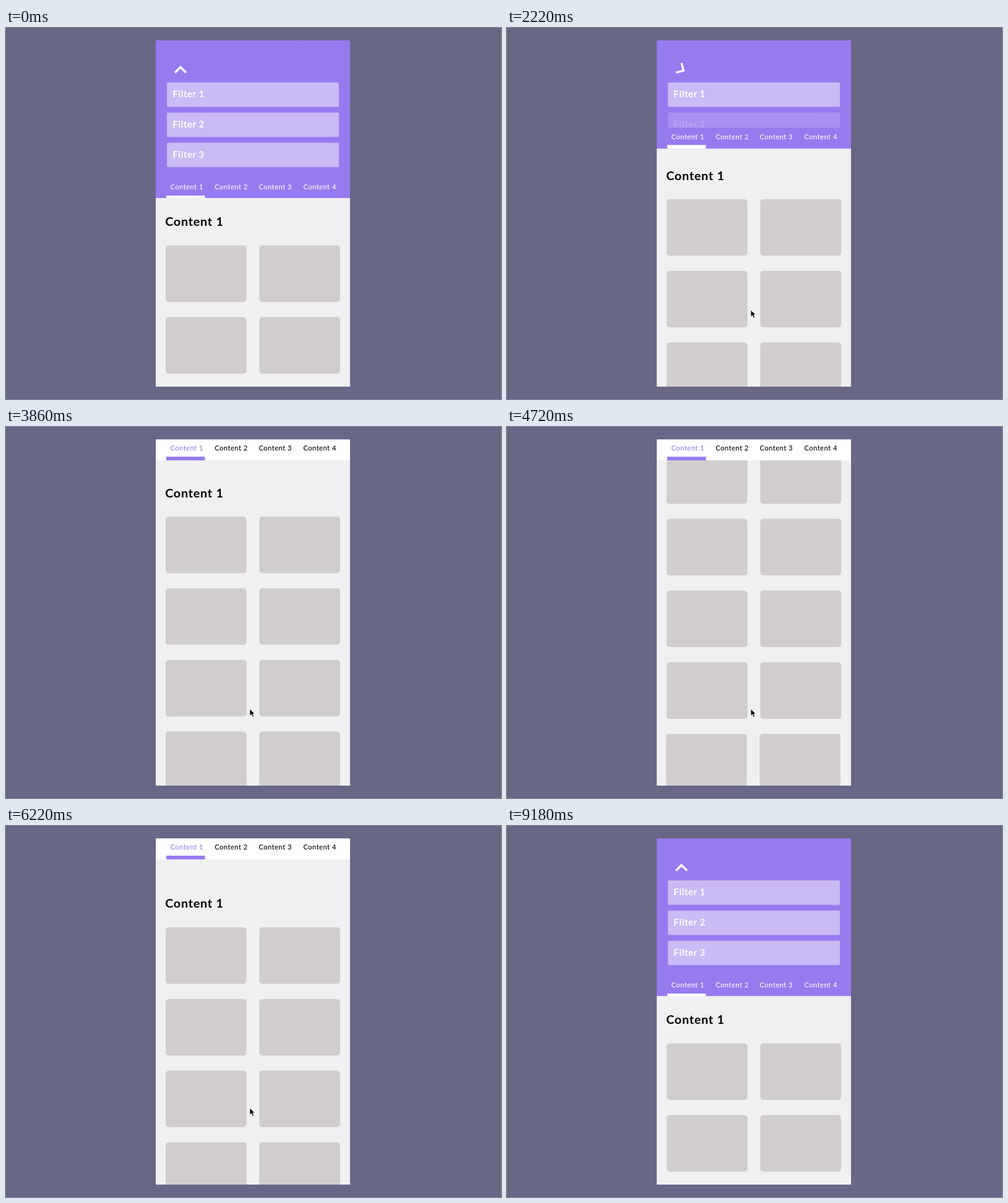
An HTML page for the animation above (9400 ms loop, 800x600 px).

```html
<!DOCTYPE html>
<html lang="en">
<head>
<meta charset="utf-8">
<title>Collapsing filter header</title>
<style>
  html, body { margin: 0; width: 100%; height: 100%; overflow: hidden; background: #686785; }
  svg { display: block; width: 800px; height: 600px; }
  text { font-family: Lato, "Open Sans", sans-serif; }
  .title { font-size: 19.8px; font-weight: 700; letter-spacing: .75px; }
  .filter { font-size: 15px; font-weight: 700; letter-spacing: .55px; fill: #fff; }
  .tab { font-size: 11.2px; font-weight: 500; letter-spacing: .45px; }
</style>
</head>
<body>
<svg viewBox="0 0 800 600">
  <defs>
    <clipPath id="screen"><rect x="242" y="20" width="314" height="560"/></clipPath>
  </defs>
  <g clip-path="url(#screen)">
    <rect x="242" y="20" width="314" height="560" fill="#f0f0f2"/>
    <g id="content">
      <text class="title" x="257.2" y="320.3">Content 1</text>
    </g>
    <rect id="header" x="242" y="20" width="314"/>
    <g id="filters"></g>
    <path id="chevron" d="M-9 5.2L0-3.8L9 5.2" fill="none" stroke="#fff" stroke-width="3.4"/>
    <g id="bar">
      <rect id="barFill" x="242" width="314"/>
      <g id="tabs"></g>
      <rect id="underline" x="259" y="28" width="62.5"/>
    </g>
    <path id="cursor" d="M0 0V11.2L2.6 8.8L4.5 13.2L6.6 12.3L4.7 8H8.2Z" stroke="#fff" stroke-width=".8"/>
  </g>
</svg>
<script>
  const LOOP = 9400;
  const PURPLE = [151, 122, 239], WHITE = [255, 255, 255], BLACK = [0, 0, 0];
  const $ = id => document.getElementById(id);

  function add(parent, tag, attrs, label) {
    const el = document.createElementNS('http://www.w3.org/2000/svg', tag);
    for (const k in attrs) el.setAttribute(k, attrs[k]);
    if (label) el.textContent = label;
    return parent.appendChild(el);
  }

  // The fifth row sits one pixel further left.
  for (let row = 0; row < 7; row++) {
    for (const x of [258, 409.3]) {
      add($('content'), 'rect', {
        x: row < 4 ? x : x - 1, y: 351.6 + row * 115.9,
        width: 130.7, height: 91.5, rx: 5, fill: '#d1cdce'
      });
    }
  }

  const filters = [0, 1, 2].map(i => {
    const g = add($('filters'), 'g', { transform: `translate(0 ${i * 48.75})` });
    add(g, 'rect', { x: 260, y: 88, width: 278, height: 39.4, rx: 2, fill: '#cabaf5' });
    add(g, 'text', { class: 'filter', x: 269.3, y: 112.3 }, `Filter ${i + 1}`);
    return g;
  });

  const tabs = [265.4, 337.2, 408.5, 480.4].map((x, i) =>
    add($('tabs'), 'text', { class: 'tab', x, y: 18.4 }, `Content ${i + 1}`));

  // Smooth curve through [time, value] keys that never overshoots them.
  function curve(keys) {
    const rate = i => (keys[i + 1][1] - keys[i][1]) / (keys[i + 1][0] - keys[i][0]);
    const slopes = keys.map((_, i) => {
      if (!i || i === keys.length - 1) return 0;
      const a = rate(i - 1), b = rate(i);
      return a * b > 0 ? 2 * a * b / (a + b) : 0;
    });
    return t => {
      if (t <= keys[0][0]) return keys[0][1];
      const i = keys.findIndex((k, n) => n && t < k[0]) - 1;
      if (i < 0) return keys[keys.length - 1][1];
      const [t0, v0] = keys[i], [t1, v1] = keys[i + 1];
      const d = t1 - t0, u = (t - t0) / d, w = 1 - u;
      return v0 * (1 + 2 * u) * w * w + v1 * u * u * (3 - 2 * u)
        + d * u * w * (slopes[i] * w - slopes[i + 1] * u);
    };
  }

  const scrollAt = curve([[1160, 0], [2220, 74.7], [3860, 206.6], [4720, 318.8], [4940, 335],
    [5300, 335], [6220, 188], [7400, 55.6], [8170, 0], [8360, -16], [8960, 0]]);
  const cursorX = curve([[20, 467], [180, 480], [460, 406], [880, 406], [1020, 394],
    [8600, 394], [9160, 466], [9180, 467]]);
  const cursorY = curve([[20, 7], [180, 150], [460, 430], [880, 430], [1020, 456],
    [8600, 456], [9160, 14], [9180, 7]]);

  const part = (v, a, b) => Math.min(1, Math.max(0, (v - a) / (b - a)));
  const blend = (a, b, k) => `rgb(${a.map((v, i) => Math.round(v + (b[i] - v) * k))})`;
  const set = (el, name, value) => el.setAttribute(name, value);

  function draw(t) {
    const s = scrollAt(t);
    const p1 = part(s, 0, 56), p2 = part(s, 56, 112), p3 = part(s, 112, 180);
    const barY = 243 - 65.5 * p1 - 48.7 * p2 - 108.8 * p3;
    const barH = 32 + 2 * p1;
    const fade = part(s, 146, 180);
    const fill = blend(PURPLE, WHITE, fade);

    set($('content'), 'transform', `translate(0 ${-s})`);
    set($('header'), 'height', barY - 18);
    set($('header'), 'fill', fill);
    set($('bar'), 'transform', `translate(0 ${barY})`);
    set($('barFill'), 'height', barH);
    set($('barFill'), 'fill', fill);
    set($('underline'), 'height', barH - 28);
    set($('underline'), 'fill', blend(WHITE, PURPLE, fade));
    tabs.forEach((tab, i) => set(tab, 'fill', blend(WHITE, i ? BLACK : PURPLE, fade)));

    [1 - p3, 1 - part(s, 0, 112), 1 - p1].forEach((o, i) => set(filters[i], 'opacity', o));
    set($('chevron'), 'transform',
      `translate(282 ${67 - 51 * p3}) rotate(${180 * part(s, 0, 112)})`);
    set($('chevron'), 'opacity', 1 - fade);
    set($('cursor'), 'transform', `translate(${cursorX(t)} ${cursorY(t)})`);
  }

  function tick() {
    draw(performance.now() % LOOP);
    requestAnimationFrame(tick);
  }
  tick();
</script>
</body>
</html>
```
